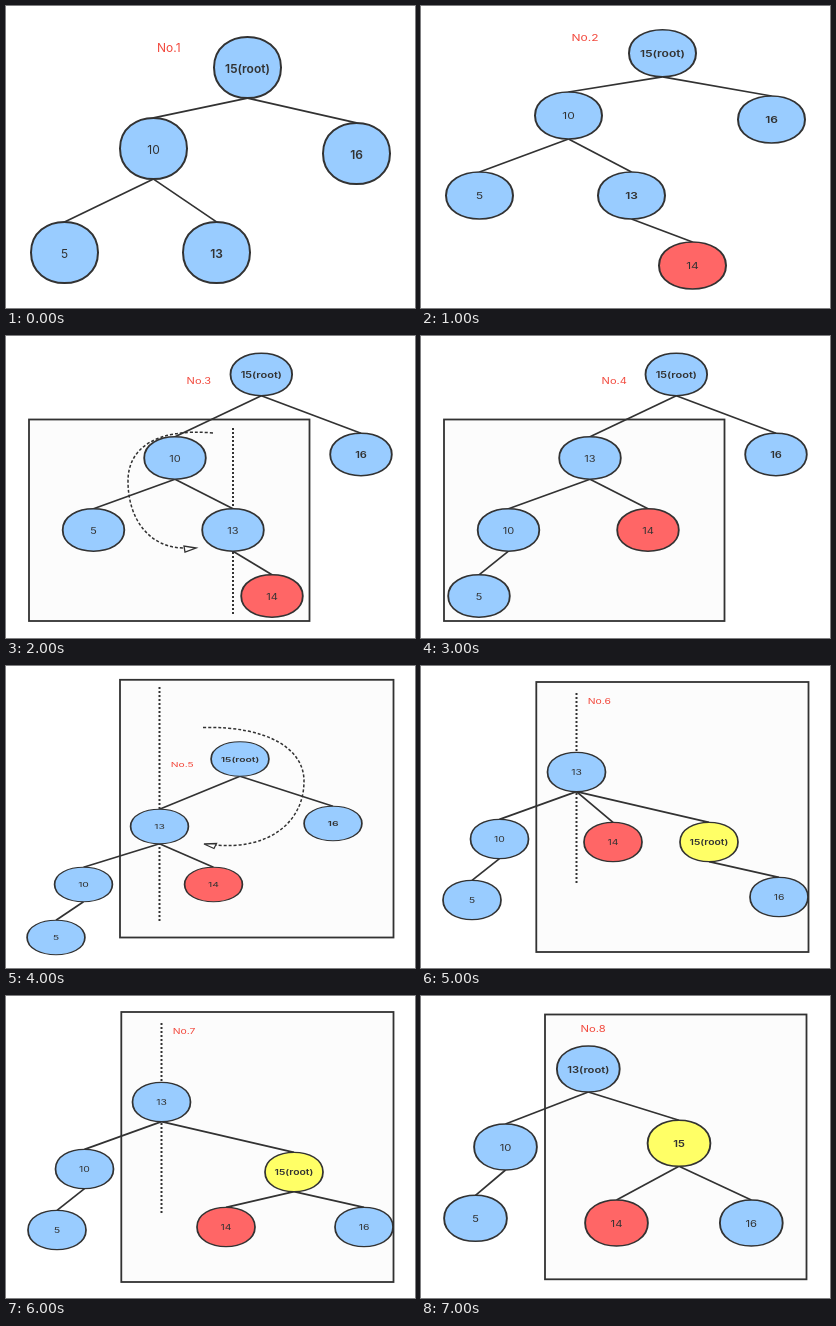
These frames come from a looping animation (409x302 px, 8000 ms). An HTML page:

```html
<!DOCTYPE html>
<html lang="en">
<head>
<meta charset="utf-8">
<title>Tree rotation</title>
<style>
  html, body { margin: 0; width: 100%; height: 100%; overflow: hidden; background: #fff; }
  svg { display: block; width: 100%; height: 100%; }
  g.scene { opacity: 0; }
  text { font: 400 12px Inter, sans-serif; fill: #323232; }
  text.strong { font-weight: 600; }
  text.title { fill: #f2493d; }
  path, rect { stroke: #323232; stroke-width: 2; fill: none; }
  .edge, .arc { stroke-width: 1.7; }
  .frame { fill: #fcfcfc; stroke-width: 1.8; }
  .axis { stroke-dasharray: 2 2; }
  .arc { stroke-width: 1.5; stroke-dasharray: 3 2; }
  .head { stroke-width: 1.3; fill: #fff; }
</style>
</head>
<body>
<svg viewBox="0 0 409 302"></svg>
<script>
const STEP = 1000;
const RX = 33.5, RY = 30.6;
const COLORS = { blue: '#99ccff', red: '#ff6666', yellow: '#ffff66' };
const svg = document.querySelector('svg');
const scenes = [];

function add(parent, tag, attrs, text) {
  const el = document.createElementNS('http://www.w3.org/2000/svg', tag);
  for (const key in attrs) el.setAttribute(key, attrs[key]);
  if (text) el.textContent = text;
  parent.append(el);
  return el;
}

// Each scene is one diagram squeezed to the stage; size holds the node radii.
function scene({ size, title, nodes, edges, root = '15', strong = '', yellow, box, axis, arc, head }) {
  const [rx, ry] = size, sx = rx / RX, sy = ry / RY;
  const g = add(svg, 'g', { class: 'scene' });
  const line = (d, cls) => add(g, 'path', { d, class: cls });
  const placed = (x, y) => add(g, 'g', { transform: `translate(${x} ${y}) scale(${sx} ${sy})` });

  if (box) {
    const [x, y, right, bottom] = box;
    add(g, 'rect', { x, y, width: right - x, height: bottom - y, class: 'frame' });
  }
  if (axis) line(`M${axis[0]} ${axis[1]}V${axis[2]}`, 'axis');
  if (arc) {
    line(arc, 'arc');
    line(head, 'head');
  }
  for (const edge of edges.split(' ')) {
    const [[x1, y1], [x2, y2]] = edge.split('-').map(key => nodes[key]);
    line(`M${x1} ${y1 + ry}L${x2} ${y2 - ry}`, 'edge');
  }
  for (const key in nodes) {
    const node = placed(...nodes[key]);
    const fill = key === '14' ? 'red' : key === yellow ? 'yellow' : 'blue';
    const bulge = RY * 4 / 3;
    add(node, 'path', {
      d: `M${-RX} 0C${-RX} ${-bulge} ${RX} ${-bulge} ${RX} 0C${RX} ${bulge} ${-RX} ${bulge} ${-RX} 0Z`,
      style: `fill:${COLORS[fill]}`
    });
    add(node, 'text', {
      y: 5.2, 'text-anchor': 'middle', class: strong.split(' ').includes(key) ? 'strong' : ''
    }, key === root ? key + '(root)' : key);
  }
  scenes.push(g);
  add(placed(...title), 'text', { x: -1, y: 4.4, class: 'title' }, 'No.' + scenes.length);
}

scene({
  size: [33.5, 30.6], title: [152, 41.5], strong: '15 16 13',
  nodes: { 15: [241.5, 61.5], 10: [147.5, 142.5], 16: [350.5, 147.5], 5: [58.5, 246.5], 13: [210.5, 246.5] },
  edges: '15-10 15-16 10-5 10-13'
});

scene({
  size: [33.5, 23.5], title: [151.5, 32], strong: '15 16 13',
  nodes: { 15: [241.5, 47.3], 10: [147.5, 109.5], 16: [350.5, 113.5], 5: [58.5, 189.5], 13: [210.5, 189.5], 14: [271.5, 259.5] },
  edges: '15-10 15-16 10-5 10-13 13-14'
});

const leftTurn = {
  size: [30.8, 21.2], title: [181.5, 45], strong: '15 16', box: [23, 83.5, 303.5, 285]
};

scene({
  ...leftTurn,
  nodes: { 15: [255.3, 38.5], 10: [169, 122], 16: [355, 118.5], 5: [87.5, 194], 13: [227, 194], 14: [266, 260] },
  edges: '15-10 15-16 10-5 10-13 13-14',
  axis: [227, 92, 278],
  arc: 'M207 97C150 92 122 112 122 145C122 185 145 212 178 212',
  head: 'M190 212L178 210L179 216Z'
});

scene({
  ...leftTurn,
  nodes: { 15: [255.3, 38.5], 13: [169, 122], 16: [355, 118.5], 10: [87.5, 194], 14: [227, 194], 5: [58, 260] },
  edges: '15-13 15-16 13-10 13-14 10-5'
});

scene({
  size: [28.9, 17.2], title: [165.5, 99], strong: '15 16', box: [114, 13.8, 387.5, 271.5],
  nodes: { 15: [234, 93], 13: [153.5, 160.5], 16: [327, 157.5], 10: [77.5, 218.5], 14: [207.5, 218.5], 5: [50, 271.5] },
  edges: '15-13 15-16 13-10 13-14 10-5',
  axis: [153.5, 21, 257],
  arc: 'M197 61.5C262 60 298 83 298 115C298 157 262 184 209 179',
  head: 'M198 178L210.5 177.5L208 182.5Z'
});

const rightTurn = {
  size: [29, 19.6], title: [167.5, 35], strong: '15', yellow: '15',
  box: [115.3, 16, 387.5, 286], axis: [155.5, 27, 217]
};

scene({
  ...rightTurn,
  nodes: { 13: [155.5, 106], 10: [78.5, 173], 14: [192, 176], 15: [288, 176], 16: [358, 231], 5: [51, 234] },
  edges: '13-10 13-14 13-15 15-16 10-5'
});

scene({
  ...rightTurn,
  nodes: { 13: [155.5, 106], 10: [78.5, 173], 14: [220, 231], 15: [288, 176], 16: [358, 231], 5: [51, 234] },
  edges: '13-10 13-15 15-14 15-16 10-5'
});

scene({
  size: [31.4, 23], title: [160.5, 33], strong: '13 15', yellow: '15', root: '13',
  box: [124, 18.5, 385.5, 283.3],
  nodes: { 13: [167.3, 73], 15: [258, 147.3], 10: [84.5, 151], 5: [54.5, 222.3], 14: [195.5, 227], 16: [330.3, 227] },
  edges: '13-10 13-15 10-5 15-14 15-16'
});

const duration = STEP * scenes.length;
scenes.forEach((g, i) => g.animate([
  { opacity: 1, offset: 0, easing: 'step-end' },
  { opacity: 0, offset: 1 / scenes.length, easing: 'step-end' },
  { opacity: 0, offset: 1 }
], { duration, delay: i * STEP - duration, iterations: Infinity }));
</script>
</body>
</html>
```
